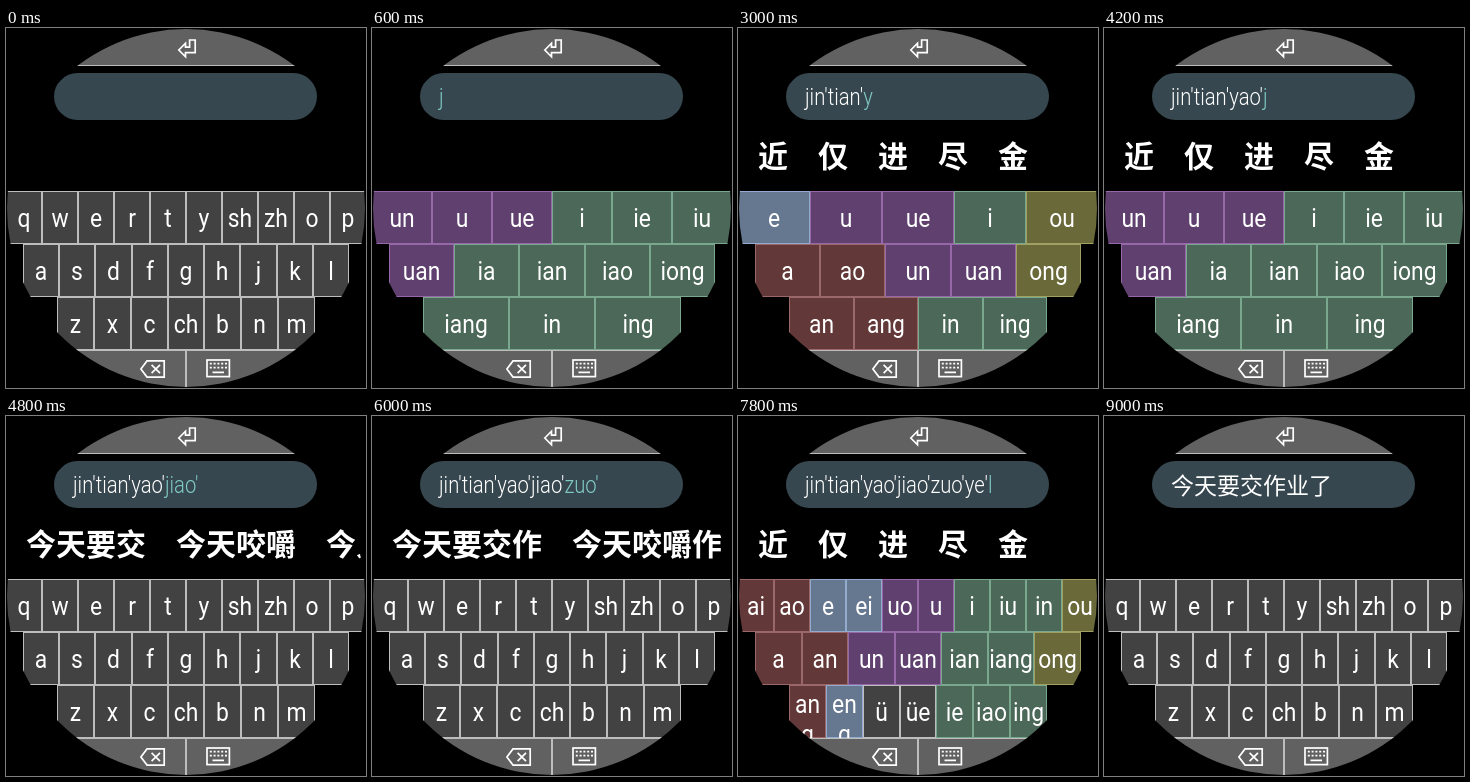
An HTML page that plays this animation: 360 px wide and 360 px high, repeating every 9600 ms.

```html
<!DOCTYPE html>
<html lang="zh-CN">
<head>
<meta charset="utf-8">
<title>Pinyin watch keyboard</title>
<style>
html, body { margin: 0; width: 100%; height: 100%; overflow: hidden; background: #000; }
svg { display: block; width: 100vw; height: 100vh; }
text { fill: #fff; white-space: pre; }
.label { font: 400 26px Roboto, sans-serif; text-anchor: middle; }
.pinyin { font: 300 23px Roboto, sans-serif; }
.active { fill: #80cbc4; }
.hanzi { font: 400 23px "Noto Sans CJK SC", "Noto Sans CJK", sans-serif; }
.pick { font: 700 30px "Noto Sans CJK SC", "Noto Sans CJK", sans-serif; }
.icon { fill: none; stroke: #fff; stroke-width: 1.7; }
</style>
</head>
<body>
<svg id="stage" viewBox="0 0 360 360" xmlns="http://www.w3.org/2000/svg">
  <clipPath id="dial"><circle cx="180" cy="180" r="179"/></clipPath>
  <clipPath id="rows"><rect y="163" width="360" height="159"/></clipPath>
  <g clip-path="url(#dial)">
    <g id="bars"></g>
    <path class="icon" d="M172.8 22L179.5 15.2V19.2H183.6V12H189.2V24.6H179.5V28.8Z"/>
    <path class="icon" d="M141 332.9H158.2V349.1H141L134.9 341ZM145.6 336.8L154 345.2M154 336.8L145.6 345.2"/>
    <rect class="icon" x="201" y="332" width="22.4" height="16.6"/>
    <path class="icon" stroke-dasharray="2 1.8" d="M203.8 335.7H221M203.8 339.7H221"/>
    <path class="icon" d="M206.5 344.3H218"/>
    <rect x="48" y="45" width="263" height="47" rx="23.5" fill="#37474f"/>
    <g id="field"></g>
    <g id="picks"></g>
    <g id="keys" clip-path="url(#rows)"></g>
  </g>
</svg>
<script>
const STEP = 600, STEPS = 16, NARROW = 0.88, ROW_H = 53;
const $ = id => document.getElementById(id);

const ROWS = [
  { x: 0, y: 163, w: 360 },
  { x: 17, y: 216, w: 326 },
  { x: 51, y: 269, w: 258 }
];

// fill and border by first letter of a final
const TINTS = {
  a: ['#633838', '#9a6868'],
  e: ['#667790', '#92abcf'],
  u: ['#5f406e', '#9768a8'],
  i: ['#4b6858', '#79a88f'],
  o: ['#69693a', '#a0a062']
};
const PLAIN = ['#424242', '#bdbdbd'];
const BAR = ['#616161', '#bdbdbd'];

const INITIALS = 'q w e r t y sh zh o p/a s d f g h j k l/z x c ch b n m';
const FINALS = {
  j: 'un u ue i ie iu/uan ia ian iao iong/iang in ing',
  t: 'ai e un uo u ui i ie ou/a eng uan ian iao ong/ao an ang ing',
  y: 'e u ue i ou/a ao un uan ong/an ang in ing',
  z: 'ai e ei un uo u ui i ou/a en eng uan ong/ao an ang',
  l: 'ai ao e ei uo u i iu in ou/a an un uan ian iang ong/ang eng ü üe ie iao ing'
};

const SYLLABLES = ['jin', 'tian', 'yao', 'jiao', 'zuo', 'ye', 'le'];
const SENTENCE = '今天要交作业了';
const SINGLES = '近 仅 进 尽 金';
const PHRASES = [
  SINGLES,
  '今天 金田 近天 仅添',
  '今天要 今天咬 今天药',
  '今天要交 今天咬嚼 今天咬交',
  '今天要交作 今天咬嚼作',
  '今天要交作业 今天咬嚼作业',
  '今天要交作业了 今天咬嚼作业了'
];

function add(parent, tag, attrs, text = '') {
  const el = document.createElementNS('http://www.w3.org/2000/svg', tag);
  for (const name in attrs) el.setAttribute(name, attrs[name]);
  el.textContent = text;
  parent.append(el);
  return el;
}

const narrowAt = (x, y) => `translate(${x} ${y}) scale(${NARROW} 1)`;

function box(parent, x, y, w, h, [fill, stroke]) {
  add(parent, 'rect', { x: x + 0.5, y: y + 0.5, width: w - 1, height: h - 1, fill, stroke });
}

function label(x, y, text) {
  return add($('keys'), 'text', { class: 'label', transform: narrowAt(x, y) }, text);
}

function drawKey(x, y, w, text, tint) {
  box($('keys'), x, y, w, ROW_H, tint);
  const mid = x + w / 2;
  const el = label(mid, y + 35.5, text);
  // labels too wide for the key break before the last letter
  if (el.getComputedTextLength() * NARROW > w) {
    el.remove();
    label(mid, y + 28, text.slice(0, -1));
    label(mid, y + 58, text.slice(-1));
  }
}

function drawKeys(layout, tinted) {
  $('keys').replaceChildren();
  layout.split('/').forEach((line, r) => {
    const { x, y, w } = ROWS[r];
    const names = line.split(' ');
    const edge = i => x + Math.round(w * i / names.length);
    names.forEach((name, i) => {
      const tint = tinted && TINTS[name[0]] || PLAIN;
      drawKey(edge(i), y, edge(i + 1) - edge(i), name, tint);
    });
  });
}

function drawPinyin(done, active) {
  const line = add($('field'), 'text', { class: 'pinyin', transform: narrowAt(67, 77) });
  add(line, 'tspan', {}, done);
  add(line, 'tspan', { class: 'active' }, active);
}

function drawPicks(list) {
  let x = 20;
  for (const word of list.split(' ')) {
    add($('picks'), 'text', { class: 'pick', x, y: 139 }, word);
    x += word.length * 30 + 30;
  }
}

function draw(step) {
  $('field').replaceChildren();
  $('picks').replaceChildren();
  const typing = step > 0 && step < STEPS - 1;
  const half = typing && step % 2 === 1;
  const n = Math.floor((step - 1) / 2);

  if (typing) {
    const done = SYLLABLES.slice(0, n).map(s => s + "'").join('');
    drawPinyin(done, half ? SYLLABLES[n][0] : SYLLABLES[n] + "'");
    if (!half) drawPicks(PHRASES[n]);
    else if (n > 0) drawPicks(SINGLES);
  } else if (step > 0) {
    add($('field'), 'text', { class: 'hanzi', x: 67, y: 77.5 }, SENTENCE);
  }
  drawKeys(half ? FINALS[SYLLABLES[n][0]] : INITIALS, half);
}

box($('bars'), 0, -2, 360, 40, BAR);
box($('bars'), 0, 322, 180, 40, BAR);
box($('bars'), 180, 322, 180, 40, BAR);

let shown = -1;
const start = performance.now();
function tick() {
  const step = Math.floor((performance.now() - start) / STEP) % STEPS;
  if (step !== shown) draw(shown = step);
  requestAnimationFrame(tick);
}
tick();
</script>
</body>
</html>
```
